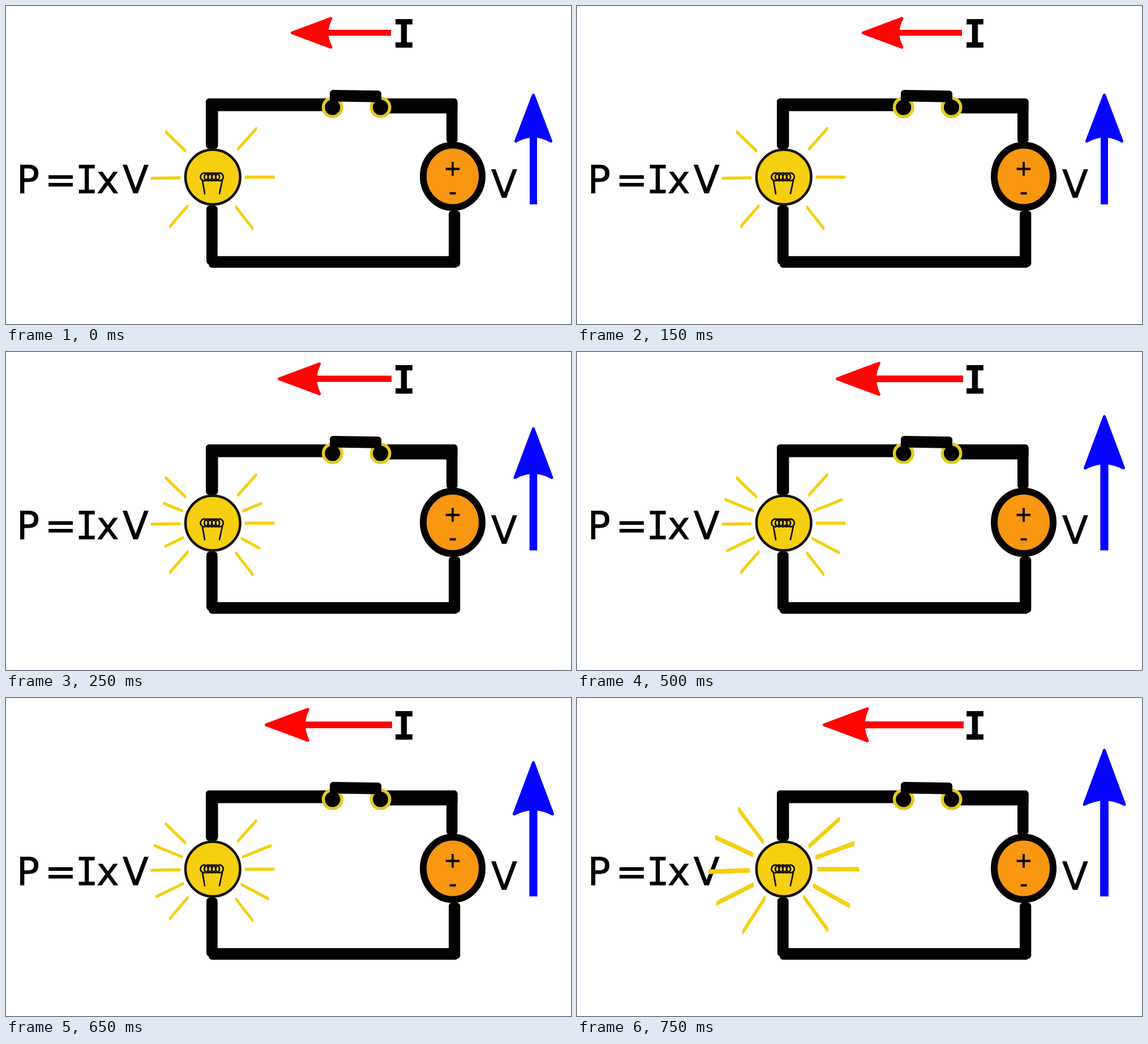
An HTML page for the animation above (1 s loop, 998 by 561 pixels).

```html
<!DOCTYPE html>
<html lang="en">
<head>
<meta charset="utf-8">
<title>Electric power: P = I x V</title>
<style>
  html, body { margin: 0; width: 100%; height: 100%; overflow: hidden; background: #fff; }
  svg { display: block; width: 100%; height: 100%; }
  text { font: 67px "DejaVu Sans", sans-serif; stroke: #000; stroke-width: .8; }
  .serif { font-family: "DejaVu Sans Mono", monospace; }
  .bold { font-weight: bold; text-anchor: middle; }
  .sign { font-size: 38px; text-anchor: middle; }
  .wire { fill: #040200; }
  .wire rect { rx: 6px; }
  .arrow { stroke-width: 5; stroke-linejoin: round; }
  .arrow line { stroke-linejoin: miter; }
</style>
</head>
<body>
<svg viewBox="0 0 998 561">
  <g class="wire">
    <rect x="353" y="163" width="217" height="22.5"/>
    <rect x="353" y="163" width="21.5" height="89"/>
    <rect x="668" y="163" width="129.5" height="26.5"/>
    <rect x="778" y="163" width="19.5" height="79"/>
    <rect x="354" y="352" width="19.7" height="104"/>
    <rect x="358" y="441.3" width="441" height="20.5"/>
    <rect x="782" y="361" width="20.3" height="99"/>
  </g>
  <g class="wire" stroke="#e0cb24" stroke-width="5.5">
    <circle cx="576.8" cy="178.8" r="16.3"/>
    <circle cx="661.5" cy="178.8" r="16.3"/>
  </g>
  <g class="wire">
    <rect x="572" y="148.5" width="91" height="20.5" transform="rotate(.9 617 159)"/>
    <rect x="572" y="149" width="12" height="28"/>
    <rect x="651" y="151" width="12" height="26"/>
  </g>

  <ellipse cx="789" cy="300.5" rx="52" ry="55" fill="#f99612" stroke="#040200" stroke-width="12"/>
  <text class="sign" x="789" y="299">+</text>
  <text class="sign" x="789" y="341">-</text>

  <circle cx="365.3" cy="301.7" r="48.3" fill="#f5cf10" stroke="#15120a" stroke-width="4.5"/>
  <g id="filament" fill="none" stroke="#15120a" stroke-width="2.8" stroke-linecap="round">
    <path d="M347 308L351 331M382 308L377 331"/>
  </g>

  <text x="18.7 68.5" y="330">P=</text>
  <text class="serif" x="122.5" y="330">I</text>
  <text x="160 206" y="330">xV</text>
  <text x="857" y="338">V</text>
  <text class="serif bold" x="703" y="73">I</text>

  <path id="rays" fill="#f5cf10" stroke="#f5cf10" stroke-width="3" stroke-linejoin="round"/>
  <g id="current" class="arrow" fill="#ff0505" stroke="#ff0505" transform="translate(0 47.3)"></g>
  <g id="voltage" class="arrow" fill="#0505ff" stroke="#0505ff" transform="matrix(0 1 1 0 931.5 0)"></g>
</svg>
<script>
const STEP = 250, STEPS = 4;
const BULB = { x: 365, y: 302 };
const $ = id => document.getElementById(id);

for (let i = 0; i < 5; i++)
  $("filament").innerHTML += `<circle cx="${350.3 + i * 6.7}" cy="301.5" r="6.8"/>`;

// Hand-drawn ray directions in degrees, clockwise from the right.
const calmAngles = [0, 28, 52, 131, 154, 179, 202, 224, 312, 338];
const brightAngles = [0, 29, 54, 123, 153, 178, 205, 233, 318, 340];

// A stroke made with an upright nib.
function ray(angle, inner, outer, nib) {
  const a = angle * Math.PI / 180;
  const [x1, x2] = [inner, outer].map(r => BULB.x + r * Math.cos(a));
  const [y1, y2] = [inner, outer].map(r => BULB.y + r * Math.sin(a));
  return `M${x1} ${y1 - nib}L${x2} ${y2 - nib}V${y2 + nib}L${x1} ${y1 + nib}Z`;
}

// Rays repeat as horizontal, side, diagonal, diagonal, side.
function calmRay(angle, i, step) {
  const kind = i % 5;
  if (kind === 0) return ray(angle, 58, 108, 1.2);
  if (kind === 2 || kind === 3) return ray(angle, 67, 115, 1.5);
  return step ? ray(angle, 58, 75 + 18 * step, 1.2) : "";
}

function rays(step) {
  return step === STEPS - 1
    ? brightAngles.map(angle => ray(angle, 61, 132, 2.6)).join("")
    : calmAngles.map((angle, i) => calmRay(angle, i, step)).join("");
}

// An arrow on the x axis, pointing left.
function arrow(tip, tail, head, half, shaft, depth) {
  const barb = tip + head - 2.5, h = half - 2.5, notch = tip + head - depth;
  return `<path d="M${tip + 3} 0L${barb} ${-h}Q${2 * notch - barb - 5} 0 ${barb} ${h}Z"/>` +
    `<line x1="${notch - 4}" x2="${tail}" stroke-width="${shaft}"/>`;
}

function draw(step) {
  $("rays").setAttribute("d", rays(step));
  $("current").innerHTML =
    arrow(502.5 - 23 * step, 680 + step, 74 + 2.7 * step, 28 + step, 10.5 + 0.6 * step, 7);
  $("voltage").innerHTML =
    arrow(154 - 21.6 * step, 350, 87 + 4.7 * step, 33.5 + 1.5 * step, 13 + 0.6 * step, 9);
}

const start = performance.now();
let shown = -1;
function tick() {
  const step = Math.floor((performance.now() - start) / STEP) % STEPS;
  if (step !== shown) draw(shown = step);
  requestAnimationFrame(tick);
}
tick();
</script>
</body>
</html>
```
